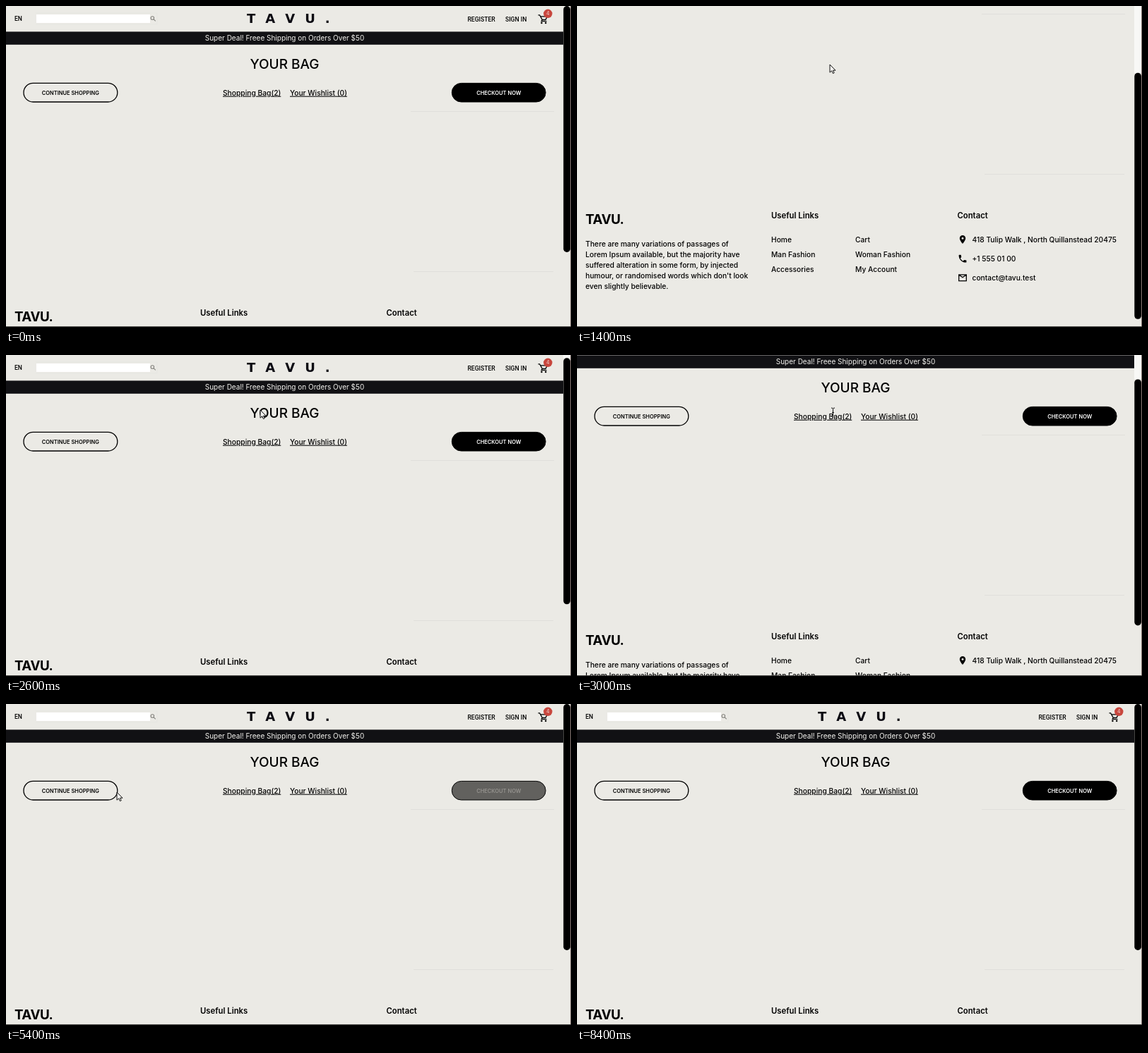
An HTML page for the animation above (8.6 s loop, 800 by 455 pixels).

```html
<!DOCTYPE html>
<html lang="en">
<head>
<meta charset="utf-8">
<title>Your bag</title>
<style>
  html, body { margin: 0; width: 100%; height: 100%; overflow: hidden; background: #ebeae5; }
  svg { display: block; width: 800px; height: 455px; font-family: Inter, "Open Sans", sans-serif; }
  .menu { font: 500 8.6px Roboto, sans-serif; }
  .brand { font: bold 18px "DejaVu Sans", sans-serif; letter-spacing: 14px; font-kerning: none; }
  .mid { text-anchor: middle; }
  .button { font-size: 7.5px; font-weight: 600; text-anchor: middle; }
  .link { font-size: 10.25px; font-weight: 500; }
  .under { text-decoration: underline; }
  .heading { font-size: 11.3px; font-weight: 600; }
  .line { fill: none; stroke: #000; stroke-width: 1.3; }
</style>
</head>
<body>
<svg viewBox="0 0 800 455">
  <rect width="800" height="455" fill="#ebeae5"/>
  <g id="page">
    <text class="menu" x="12" y="21">EN</text>
    <path d="M42 10H214V26H42" fill="none" stroke="#e3e2dd" stroke-width=".6"/>
    <rect x="43" y="12" width="161" height="12" fill="#fff"/>
    <g fill="none" stroke="#85847f" stroke-width="1.1">
      <circle cx="207.3" cy="17" r="2.3"/><path d="M209 18.7L211.7 21.4"/>
    </g>
    <text class="brand" x="341" y="23.5" fill="#0b0a12">TAVU.</text>
    <text class="menu" x="653.5" y="22">REGISTER</text>
    <text class="menu" x="707" y="22">SIGN IN</text>
    <path class="line" d="M753.5 12.8h2.1l3.7 6.7h4.7l2.3-4.6M759.3 19.5l-1.2 2.2h7.4M757 14.9h9"/>
    <circle cx="758.4" cy="24" r="1.2"/><circle cx="764.2" cy="24" r="1.2"/>
    <circle cx="767.3" cy="10.8" r="6.2" fill="#c8463d"/>
    <text class="mid" x="767.3" y="13.4" font-size="7" fill="#f0d5d0">4</text>

    <rect y="36.4" width="789" height="18.4" fill="#111114"/>
    <text class="mid" x="394.5" y="49.2" font-size="10" fill="#f4f3ef">Super Deal! Freee Shipping on Orders Over $50</text>
    <text class="mid" x="394.5" y="89.3" font-size="19" font-weight="500">YOUR BAG</text>

    <rect class="line" x="25" y="109.4" width="132.8" height="26.6" rx="13.3"/>
    <text class="button" x="91.3" y="125.7">CONTINUE SHOPPING</text>
    <text class="link under" x="307" y="126.7">Shopping Bag(2)</text>
    <text class="link under" x="402" y="126.7">Your Wishlist (0)</text>
    <rect id="checkout" x="631.3" y="109.4" width="132.8" height="26.6" rx="13.3" stroke="#000"/>
    <text id="checkoutLabel" class="button" x="697.8" y="125.7">CHECKOUT NOW</text>
    <path d="M573 149.5H776M577 376.5H775" stroke="#dedcd8" stroke-width=".8"/>

    <text x="12" y="447.4" font-size="18.8" font-weight="700" letter-spacing="-.5">TAVU.</text>
    <text class="heading" x="275" y="438.6">Useful Links</text>
    <text class="heading" x="538.5" y="438.6">Contact</text>
    <g id="footer" class="link"></g>

    <path transform="translate(538.8 461.8) scale(.6)" d="M12 2C8.1 2 5 5.1 5 9c0 5.3 7 13 7 13s7-7.7 7-13c0-3.9-3.1-7-7-7zm0 9.5a2.5 2.5 0 1 1 0-5 2.5 2.5 0 0 1 0 5z"/>
    <path transform="translate(538.8 489) scale(.6)" d="M6.6 10.8c1.4 2.8 3.8 5.1 6.6 6.6l2.2-2.2c.3-.3.7-.4 1-.2 1.1.4 2.3.6 3.6.6.6 0 1 .4 1 1V20c0 .6-.4 1-1 1C10.6 21 3 13.4 3 4c0-.6.4-1 1-1h3.5c.6 0 1 .4 1 1 0 1.3.2 2.5.6 3.6.1.3 0 .7-.3 1z"/>
    <path class="line" d="M540.7 518.8h10.6v8.8h-10.6zl5.3 4 5.3-4"/>
  </g>

  <rect id="track" x="789" width="10" fill="#f8f8f6"/>
  <rect id="thumb" x="789.3" width="9.7" height="349" rx="4.8"/>
  <path d="M799.5 0V455" stroke="#6d5a56" stroke-width=".8"/>
  <path d="M0 454.5H800" stroke="#3d3c3a"/>

  <g id="cursor" stroke="#111" stroke-linejoin="round">
    <path id="arrow" d="M0 0V11.2L2.6 8.8 4.4 12.6 6.2 11.8 4.5 8.2H8z" fill="#f4f3f0"/>
    <path id="beam" d="M-2.5-5.5Q0-5.5 0-4V5Q0 6.5-2.5 6.5M2.5-5.5Q0-5.5 0-4M0 5Q0 6.5 2.5 6.5M-1.5 1H1.5" fill="none"/>
    <path id="hand" d="M-1 .7Q0-.7 1 .7V4.3Q2.6 3.5 3.2 4.7 4.7 4 5.2 5.3 6.8 5 6.8 6.6V8.2L5.5 11H0L-3.3 6.8Q-3 5.3-1 6.6z" fill="#f4f3f0" stroke-width=".9"/>
  </g>
</svg>
<script>
const LOOP = 8600, STEP = 200, VIEW = 455, PAGE = 593;
const THUMB_LEAD = 100; // the scrollbar runs slightly ahead of the page
const byId = id => document.getElementById(id);

function addText(x, y, lines, gap) {
  lines.forEach((line, i) => {
    const text = document.createElementNS("http://www.w3.org/2000/svg", "text");
    text.setAttribute("x", x);
    text.setAttribute("y", y + i * gap);
    text.textContent = line;
    byId("footer").append(text);
  });
}

addText(12, 478.7, [
  "There are many variations of passages of",
  "Lorem Ipsum available, but the majority have",
  "suffered alteration in some form, by injected",
  "humour, or randomised words which don't look",
  "even slightly believable."
], 15);
addText(275, 472.7, ["Home", "Man Fashion", "Accessories"], 21);
addText(394, 472.7, ["Cart", "Woman Fashion", "My Account"], 21);
addText(559.5, 472.7, ["418 Tulip Walk , North Quillanstead 20475", "+1 555 01 00", "contact@tavu.test"], 27);

// Each key: time, values.
const scrollKeys = [[200, 0], [800, 66], [900, 66], [1200, 138], [1400, 138], [1900, 0],
                    [2600, 0], [3000, 36], [3300, 70], [3800, 0]];
const cursorKeys = [[400, 358, 83], [1400, 358, 83], [2000, 360, 78], [2600, 360, 78],
                    [3000, 362.5, 80.5], [3600, 362.5, 80.5], [4000, 664, 127],
                    [5000, 664, 127], [5400, 157, 125], [5800, 120, 122]];
const cursorShapes = [[400, "arrow"], [2800, "beam"], [3800, "hand"], [5200, "arrow"],
                      [5600, "hand"], [6800, "none"]];

function sample(keys, time) {
  const next = keys.findIndex(key => key[0] > time);
  if (next < 0) return keys[keys.length - 1].slice(1);
  if (next === 0) return keys[0].slice(1);
  const from = keys[next - 1], to = keys[next];
  const p = (time - from[0]) / (to[0] - from[0]);
  const eased = p * p * (3 - 2 * p);
  return from.slice(1).map((v, i) => v + (to[i + 1] - v) * eased);
}

function draw(time) {
  const [scroll] = sample(scrollKeys, time);
  byId("page").setAttribute("transform", `translate(0 ${-Math.round(scroll)})`);
  const thumbY = sample(scrollKeys, time + THUMB_LEAD)[0] * VIEW / PAGE;
  byId("thumb").setAttribute("y", thumbY);
  byId("track").setAttribute("height", thumbY);

  const busy = time >= 4000 && time < 6400;
  byId("checkout").setAttribute("fill", busy ? "#62615e" : "#000");
  byId("checkoutLabel").setAttribute("fill", busy ? "#94928e" : "#fff");

  const [x, y] = sample(cursorKeys, time);
  byId("cursor").setAttribute("transform", `translate(${x} ${y})`);
  const shape = cursorShapes.filter(key => key[0] <= time).pop()?.[1];
  for (const id of ["arrow", "beam", "hand"]) {
    byId(id).style.display = id === shape ? "" : "none";
  }
}

const start = performance.now();
function tick() {
  const time = (performance.now() - start) % LOOP;
  draw(Math.floor(time / STEP) * STEP);
  requestAnimationFrame(tick);
}
tick();
</script>
</body>
</html>
```
